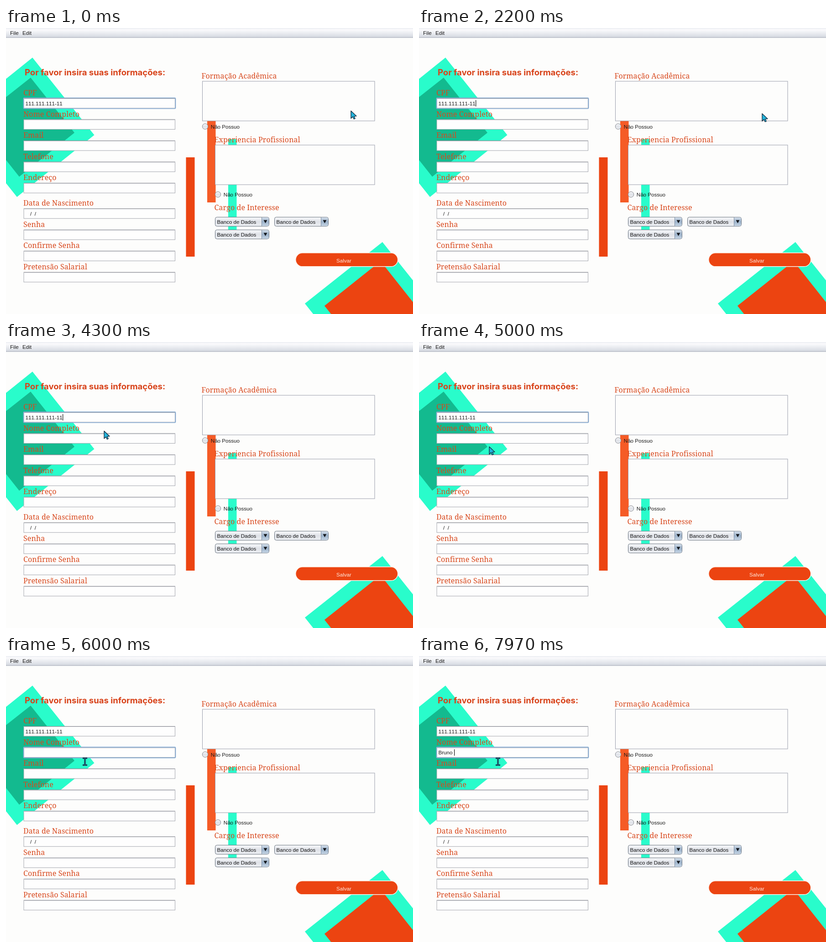
An HTML page for the animation above (8000 ms loop, 892 px wide and 628 px high).

```html
<!DOCTYPE html>
<html lang="pt">
<head>
<meta charset="utf-8">
<title>Cadastro</title>
<style>
html, body { margin: 0; width: 100%; height: 100%; overflow: hidden; background: #fdfdfc; }
svg { display: block; width: 100%; height: 100%; }
text { white-space: pre; }
.ui { font: 11.6px "Liberation Sans", Arial, sans-serif; font-kerning: none; fill: #181818; }
.label { font: 16px "Noto Serif", serif; letter-spacing: .1px; fill: #d8481d; }
.title { font: 700 18.5px Inter, sans-serif; fill: #d8431a; }
</style>
</head>
<body>
<svg id="stage" viewBox="0 0 892 628">
  <defs>
    <linearGradient id="bar" x2="0" y2="1">
      <stop offset="0" stop-color="#eceef2"/><stop offset=".2" stop-color="#fafafc"/>
      <stop offset=".5" stop-color="#eceef2"/><stop offset="1" stop-color="#d3d7df"/>
    </linearGradient>
    <linearGradient id="grey" x2="0" y2="1">
      <stop offset="0" stop-color="#f8f9fb"/><stop offset=".5" stop-color="#dfe2e8"/>
      <stop offset="1" stop-color="#eef0f4"/>
    </linearGradient>
    <linearGradient id="blue" x2="0" y2="1">
      <stop offset="0" stop-color="#d3deea"/><stop offset=".5" stop-color="#9db3cb"/>
      <stop offset="1" stop-color="#c4d4e4"/>
    </linearGradient>
  </defs>
  <g id="scene"></g>
  <rect id="focus" x="38.5" width="333" height="23.5" rx="1.5" fill="none" stroke="#86add6" stroke-width="1.7"/>
  <text id="name" class="ui" x="42.5" y="216"></text>
  <rect id="caret" width="1.2" height="14" fill="#111"/>
  <path id="arrow" d="M0 0V16.5L4 12.8 6.4 18 9.2 16.8 6.8 11.8 12 11.4Z"
        fill="#22b4dc" stroke="#14283a" stroke-width="1.3" stroke-linejoin="round"/>
  <g id="beam" fill="none">
    <path d="M-5-7.5H5M-5 7.5H5M0-7.5V7.5" stroke="#14304a" stroke-width="3.2"/>
    <path d="M-4-7.5H4M-4 7.5H4M0-7.5V7.5" stroke="#2a6f88" stroke-width=".8"/>
  </g>
</svg>
<script>
const LOOP = 8000;
const TEAL = '#29fccb', ORANGE = '#ec4411';
const $ = id => document.getElementById(id);
const scene = $('scene');

function add(tag, attrs, content = '') {
  const el = document.createElementNS('http://www.w3.org/2000/svg', tag);
  for (const key in attrs) el.setAttribute(key, attrs[key]);
  el.textContent = content;
  scene.appendChild(el);
  return el;
}
const rect = (x, y, width, height, fill, more) => add('rect', { x, y, width, height, fill, ...more });
const poly = (points, fill) => add('polygon', { points, fill });
const text = (cls, x, y, str, more) => add('text', { class: cls, x, y, ...more }, str);

// Background shapes
poly('58,65 193.5,235 24,371 -111,201', TEAL);
poly('54,109 150,230 29,326.5 -67,205', '#13ba8f');
poly('825,470 960,640 790,775 655,605', TEAL);
poly('821,512 918,635 796,733 698,610', ORANGE);
rect(394.5, 284, 19, 218, ORANGE);
rect(441, 204, 18.5, 179, '#f55b26');
rect(487, 244, 18.5, 199, TEAL);

// Menu
rect(0, 0, 892, 21, 'url(#bar)');
rect(0, 20.3, 892, 1.2, '#aab0bb');
text('ui', 9, 15, 'File');
text('ui', 36, 15, 'Edit');

// Left column
text('title', 41, 104, 'Por favor insira suas informações:');
const labels = ['CPF', 'Nome Completo', 'Email', 'Telefone', 'Endereço',
  'Data de Nascimento', 'Senha', 'Confirme Senha', 'Pretensão Salarial'];
const fieldY = i => 154.5 + 46.55 * i + (i > 4 ? 9.5 : 0);
labels.forEach((label, i) => {
  const y = fieldY(i);
  text('label', 38, y - 6.5, label);
  rect(39, y, 331.5, 21.5, '#fefefe', { stroke: '#a3a5ad' });
  rect(39.5, y - .5, 331, 1, '#85878f');
  rect(39.5, y + .5, 331, 1, '#dcdde1');
});
const cpf = text('ui', 42.5, 169.5, '111.111.111-11');
text('ui', 53, 411.5, '/  /');

// Right column
function area(x, y, w, labelX, label) {
  rect(x, y, w, 87, '#fdfdfc', { stroke: '#9a9eac' });
  text('label', labelX, y - 6, label);
}
function radio(cx, cy) {
  add('circle', { cx, cy, r: 6.2, fill: 'url(#grey)', stroke: '#85888f' });
  text('ui', cx + 12.3, cy + 4.5, 'Não Possuo');
}
function combo(x, y) {
  rect(x, y, 118, 20, 'url(#grey)', { rx: 4, stroke: '#68727f' });
  add('path', { d: `M${x + 102} ${y + .5}h12q3.5 0 3.5 3.5v12q0 3.5-3.5 3.5h-12z`, fill: 'url(#blue)' });
  rect(x + 101.5, y + .5, 1, 19, '#7f8fa3');
  poly(`${x + 106},${y + 6.5} ${x + 114},${y + 6.5} ${x + 110},${y + 13.5}`, '#14181e');
  text('ui', x + 4, y + 14.3, 'Banco de Dados');
}
area(430.5, 117, 377.5, 428.5, 'Formação Acadêmica');
radio(436.5, 216.2);
area(458.5, 257, 349.5, 456.5, 'Experiencia Profissional');
radio(464.5, 365.5);
text('label', 456.5, 400, 'Cargo de Interesse');
combo(458.5, 415.3);
combo(588.5, 415.3);
combo(458.5, 443.2);

rect(634.8, 493.8, 224, 30, ORANGE, { rx: 15, stroke: '#fff5ec', 'stroke-width': 1.4 });
text('ui', 740.5, 515, 'Salvar', { 'text-anchor': 'middle', style: 'fill:#ffe9df' });

// Motion: [time, x, y], eased between stops
const path = [[0, 756, 182], [400, 756, 182], [530, 755, 184], [730, 754, 185], [1200, 754, 185],
  [2000, 752, 188], [3230, 752, 188], [3470, 376, 162], [4000, 232, 186],
  [5000, 154, 230], [5250, 162, 226], [5480, 173, 232]];
const BEAM = 5250, CLICK = 5480;
const typed = 'Bruno ';
const keys = [6740, 6900, 7180, 7400, 7600, 7800];

function pointer(t) {
  const i = path.findIndex(p => p[0] > t);
  if (i < 0) return path[path.length - 1].slice(1);
  const [t0, x0, y0] = path[i - 1], [t1, x1, y1] = path[i];
  const u = (t - t0) / (t1 - t0), k = u * u * (3 - 2 * u);
  return [x0 + (x1 - x0) * k, y0 + (y1 - y0) * k];
}

function draw(t) {
  const clicked = t >= CLICK;
  const count = keys.filter(k => t >= k).length;
  const name = $('name');
  name.textContent = typed.slice(0, count);

  const box = fieldY(clicked ? 1 : 0);
  $('focus').setAttribute('y', box - 1);

  // The caret blinks every 500 ms; a click or key shows it again.
  const since = count ? keys[count - 1] : clicked ? CLICK : 30;
  const lit = t >= since && Math.floor((t - since) / 500) % 2 === 0;
  const width = clicked ? (count ? name.getComputedTextLength() : 0) : cpf.getComputedTextLength();
  const caret = $('caret');
  caret.setAttribute('x', 42.8 + width);
  caret.setAttribute('y', box + 3.8);
  caret.setAttribute('visibility', lit ? 'visible' : 'hidden');

  const place = `translate(${pointer(t)})`;
  const beam = t >= BEAM;
  $('arrow').setAttribute('transform', place);
  $('beam').setAttribute('transform', place);
  $('arrow').setAttribute('visibility', beam ? 'hidden' : 'visible');
  $('beam').setAttribute('visibility', beam ? 'visible' : 'hidden');
}

function tick() {
  draw(performance.now() % LOOP);
  requestAnimationFrame(tick);
}
tick();
</script>
</body>
</html>
```
